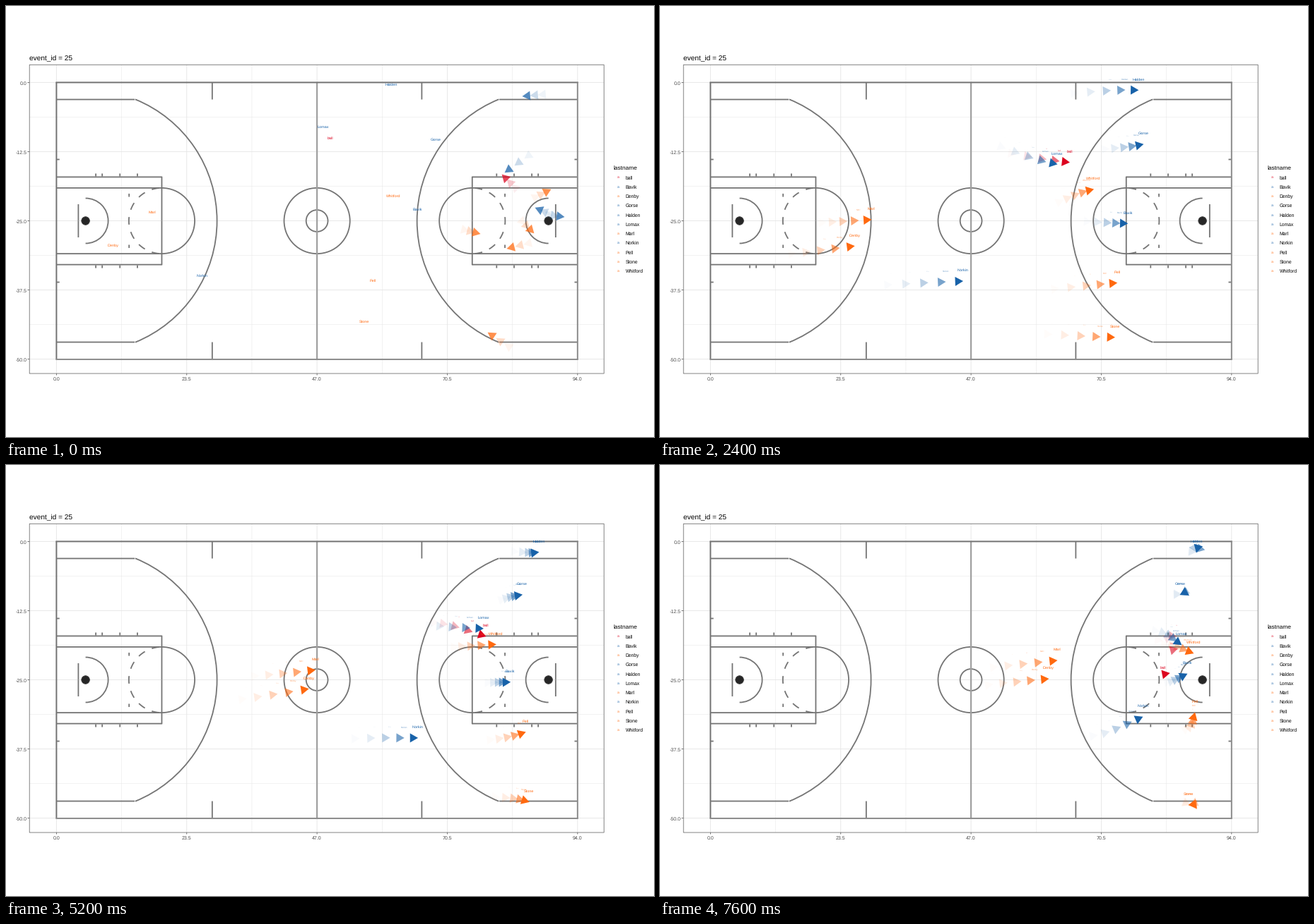
Animation of 917 by 611 pixels, one loop 8000 ms. Source, as a matplotlib script:

```python
import numpy as np
import matplotlib.pyplot as plt
from matplotlib.animation import FuncAnimation
from matplotlib.patches import Arc, Circle, Polygon, Rectangle

W, H, DPI = 917, 611, 100
FRAMES, INTERVAL = 20, 400
PX = 72 / DPI
plt.rcParams.update({"font.family": "Liberation Sans", "text.hinting": "none"})

BLUE, ORANGE, RED = "#1862a9", "#ff690f", "#dc0520"
LINE, PALE = "#747474", "#a0a0a0"
FT, LEFT, TOP = 7.845, 71.4, 108.4
RIGHT, BOTTOM, MID_Y = LEFT + 94 * FT, TOP + 50 * FT, TOP + 25 * FT
WAKE = 5

# Key points of each run, joined by a smooth curve.
KEYS = [0, 5, 10, 15, 19]
BALL_KEYS = [0, 5, 10, 15, 17, 19]
RUNS = {
    "ball": (RED, (459, 203), (565, 220), (625, 226), (711, 249), (731, 243), (712, 303)),
    "Bavik": (BLUE, (582, 304), (651, 308), (696, 308), (724, 306), (746, 296)),
    "Denby": (ORANGE, (152, 355), (254, 343), (362, 328), (471, 311), (550, 303)),
    "Gorse": (BLUE, (608, 205), (674, 198), (714, 187), (737, 183), (736, 184)),
    "Halden": (BLUE, (545, 127), (658, 119), (737, 124), (758, 123), (759, 124)),
    "Lomax": (BLUE, (449, 187), (546, 221), (620, 229), (707, 236), (738, 255)),
    "Marl": (ORANGE, (207, 308), (281, 304), (378, 297), (478, 286), (562, 277)),
    "Norkin": (BLUE, (277, 398), (404, 391), (522, 387), (619, 383), (683, 357)),
    "Pell": (ORANGE, (519, 405), (629, 394), (704, 387), (749, 371), (757, 351)),
    "Stone": (ORANGE, (507, 463), (623, 469), (713, 472), (749, 481), (748, 482)),
    "Whitford": (ORANGE, (548, 285), (604, 262), (651, 257), (720, 255), (755, 267)),
}

# Last spots of the preceding play: position and velocity.
REMNANTS = [
    (RED, 702, 239, -7, -7),
    (BLUE, 731, 128, -11, 1), (BLUE, 706, 236, -14, 10),
    (BLUE, 749, 286, -7, -3), (BLUE, 790, 299, 8, 1),
    (ORANGE, 771, 260, 8, -4), (ORANGE, 747, 322, 6, 6), (ORANGE, 671, 323, 8, 2),
    (ORANGE, 709, 344, -12, 3), (ORANGE, 682, 463, -12, -8),
]


def smooth_path(keys, points):
    """Cubic Hermite curve through the points, sampled at every frame."""
    keys, p = np.array(keys, float), np.array(points, float)
    slope = np.gradient(p, keys, axis=0)
    t = np.arange(FRAMES)
    i = np.clip(np.searchsorted(keys, t, side="right") - 1, 0, len(keys) - 2)
    h = (keys[i + 1] - keys[i])[:, None]
    s = (t - keys[i])[:, None] / h
    return ((1 + 2 * s) * (1 - s) ** 2 * p[i] + s * (1 - s) ** 2 * h * slope[i]
            + s * s * (3 - 2 * s) * p[i + 1] + s * s * (s - 1) * h * slope[i + 1])


def fade(age):
    return (1 - age / WAKE) ** 2.4


paths = {name: smooth_path(BALL_KEYS if name == "ball" else KEYS, points)
         for name, (_, *points) in RUNS.items()}

fig = plt.figure(figsize=(W / DPI, H / DPI), dpi=DPI, facecolor="white")
ax = fig.add_axes([0, 0, 1, 1])
ax.set_xlim(0, W)
ax.set_ylim(H, 0)
ax.axis("off")


def line(x0, y0, x1, y1, color=LINE, width=1.8, z=2):
    ax.plot([x0, x1], [y0, y1], color=color, lw=width * PX, zorder=z,
            solid_capstyle="butt", snap=False)


def text(x, y, s, size, color="black", ha="left", va="center_baseline", **kw):
    return ax.text(x, y, s, fontsize=size * PX, color=color, ha=ha, va=va, **kw)


def arc(x, y, r, middle, half):
    """Arc around a middle angle, counted clockwise on screen."""
    ax.add_patch(Arc((x, y), 2 * r, 2 * r, theta1=middle - half, theta2=middle + half,
                     color=LINE, lw=1.8 * PX, zorder=2))


def draw_axes():
    for k in range(9):
        x, y = LEFT + k * 11.75 * FT, TOP + k * 6.25 * FT
        width = 0.5 if k % 2 else 0.9
        line(x, 83, x, 521, "#e6e6e6", width, 0)
        line(33, y, 846, y, "#e6e6e6", width, 0)
        if k % 2 == 0:
            line(x, 521, x, 523.5, "#555555", 0.8)
            line(30.5, y, 33, y, "#555555", 0.8)
            text(x, 528.5, f"{k * 11.75:.1f}", 7, "#4d4d4d", "center")
            text(29.5, y + 0.5, f"{-k * 6.25 if k else 0:.1f}", 7, "#4d4d4d", "right")
    ax.add_patch(Rectangle((33.2, 83.3), 813, 437.7, fill=False, ec="#666666",
                           lw=0.8 * PX, zorder=3, snap=False))
    text(33, 77, "event_id = 25", 10.1, va="baseline")


def draw_end(at, turn):
    """One half of the court; at() maps feet from the baseline to x."""
    def across(ft, dy):
        for s in (-1, 1):
            line(at(0), MID_Y + s * dy, at(ft), MID_Y + s * dy)

    def upright(ft, dy0, dy1):
        for s in (-1, 1):
            line(at(ft), MID_Y + s * dy0, at(ft), MID_Y + s * dy1)

    hoop, stripe = at(5.25), at(19)
    across(14.1, 172)
    across(19, 62.1)
    across(19, 46.6)
    across(0.55, 87)
    upright(19, 0, 62.8)
    upright(28.1, 172, 196)
    upright(13.1, 34, 38.5)
    for ft in (7.1, 8.25, 11.45, 14.6):
        upright(ft, 63, 67)
    upright(3.95, 0, 23.5)
    arc(hoop, MID_Y, 186, turn, 67.8)
    arc(hoop, MID_Y, 32, turn, 90)
    arc(stripe, MID_Y, 46.6, turn, 90)
    for k in range(-3, 4):
        arc(stripe, MID_Y, 46.6, turn + 180 + 26.3 * k, 6.6)
    ax.add_patch(Circle((hoop, MID_Y), 5.8, fc="#262626", ec="#444444", lw=0.8 * PX, zorder=2))


def draw_court():
    draw_end(lambda ft: LEFT + ft * FT, 0)
    draw_end(lambda ft: RIGHT - ft * FT, 180)
    centre = (LEFT + RIGHT) / 2
    for r in (46.6, 15.4):
        arc(centre, MID_Y, r, 0, 180)
    line(centre, TOP, centre, BOTTOM, PALE, 2.2)
    line(LEFT - 1, TOP, RIGHT + 1, TOP, width=2)
    line(LEFT, TOP, LEFT, BOTTOM, width=2)
    line(RIGHT, TOP, RIGHT, BOTTOM, "#8c8c8c", 2)
    line(LEFT - 1, BOTTOM + 0.3, RIGHT + 1, BOTTOM + 0.3, "#8c8c8c", 2)


def draw_legend():
    text(859, 228.8, "lastname", 8.4)
    for k, (name, (color, *_)) in enumerate(RUNS.items()):
        y = 242.6 + 13.27 * k
        text(866, y, "a", 5.5, color, "center", alpha=0.8)
        text(876.5, y + 0.3, name, 6.75)


def marker(spot, velocity, color, alpha):
    """Triangle that trails its spot and points along the velocity."""
    ahead = np.array(velocity) / max(np.hypot(*velocity), 1e-9)
    aside = np.array([-ahead[1], ahead[0]])
    tip, back = spot + 0.5 * ahead, spot - 10.8 * ahead
    return ax.add_patch(Polygon([tip, back + 6.5 * aside, back - 6.5 * aside],
                                fc=color, ec="none", alpha=alpha, zorder=4))


live = []


def draw_remnants(frame):
    for k in (2, 1, 0):
        for color, x, y, *velocity in REMNANTS:
            spot = np.array([x, y]) - k * np.array(velocity)
            live.append(marker(spot, velocity, color, 0.74 * 0.3 ** k * 0.4 ** frame))


def update(frame):
    for artist in live:
        artist.remove()
    live.clear()
    if frame < WAKE - 1:
        draw_remnants(frame)
    for age in range(min(frame, WAKE - 1), -1, -1):
        t, alpha = frame - age, fade(age)
        for name, path in paths.items():
            color = RUNS[name][0]
            if t > 0:
                live.append(marker(path[t], path[t] - path[t - 1], color, alpha))
            live.append(text(path[t, 0], path[t, 1] - 15.5, name, 5.5 * max(alpha, 0.2),
                             color, "center", alpha=alpha, zorder=5))
    return live


draw_axes()
draw_court()
draw_legend()
anim = FuncAnimation(fig, update, frames=FRAMES, interval=INTERVAL,
                     init_func=lambda: live, repeat=True, repeat_delay=0, blit=False)
plt.show()
```
